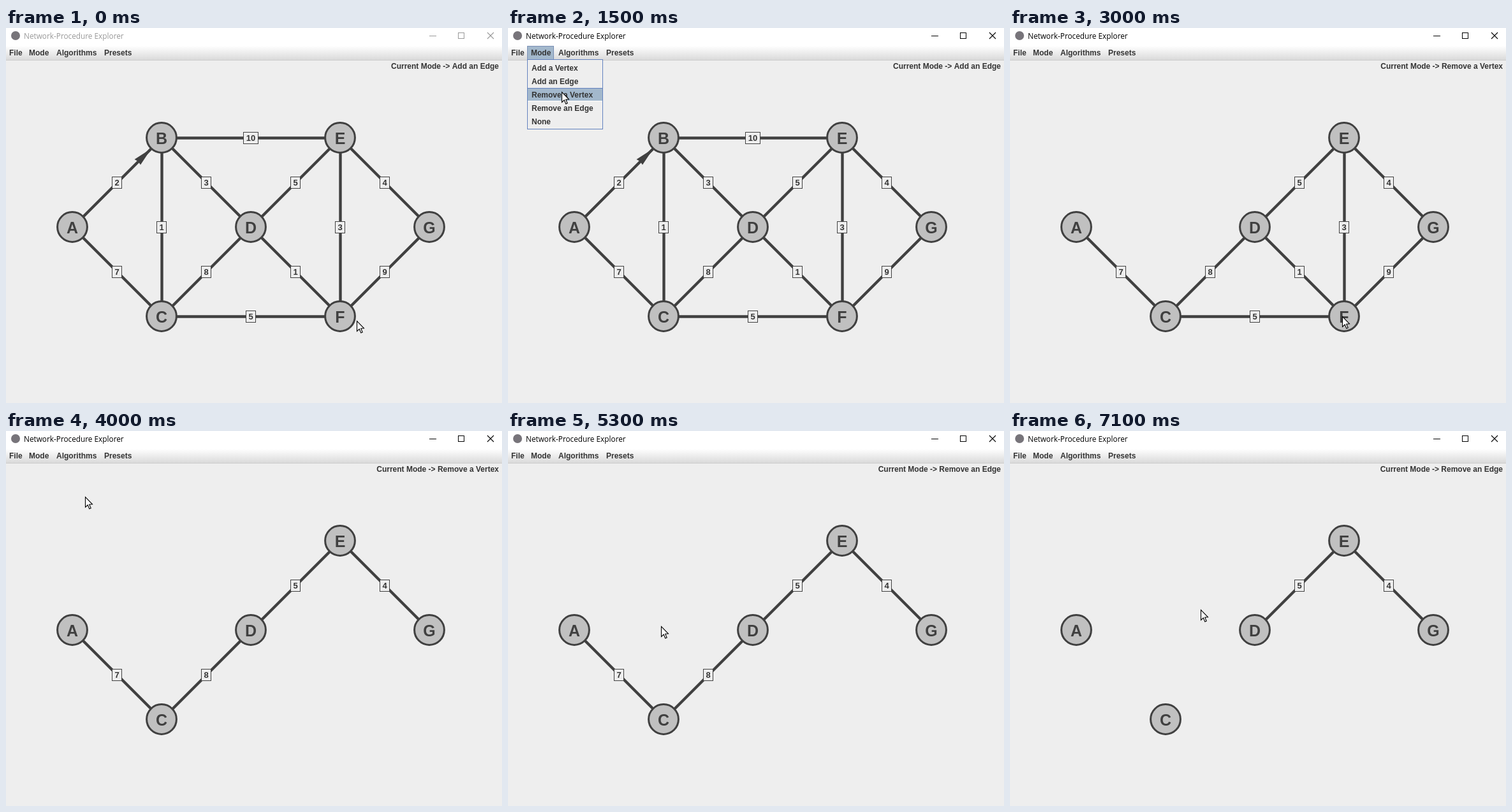
An HTML page with a canvas for the animation above (7.2 s loop, 778x588 px).

```html
<!DOCTYPE html>
<html lang="en">
<head>
<meta charset="utf-8">
<title>Network-Procedure Explorer</title>
<style>
  html, body { margin: 0; width: 778px; height: 588px; overflow: hidden; background: #eee; }
  canvas { display: block; }
</style>
</head>
<body>
<canvas id="stage" width="778" height="588"></canvas>
<script>
const ctx = document.getElementById('stage').getContext('2d');
const LOOP = 7200, STEP = 100, DARK = '#404040', INK = '#333', BLUE = '#6382bf';
const SANS = '"Liberation Sans", Arial, sans-serif';

const vertices = {
  A: [104, 312], B: [244, 172], C: [244, 452], D: [384, 312],
  E: [524, 172], F: [524, 452], G: [664, 312]
};
const edges = ['AB2', 'AC7', 'BC1', 'BD3', 'BE10', 'CD8', 'CF5', 'DE5', 'DF1', 'EF3', 'EG4', 'FG9'];
const removedAt = { B: 2400, F: 3300, CD: 5700, AC: 6400 };
const items = ['Add a Vertex', 'Add an Edge', 'Remove a Vertex', 'Remove an Edge', 'None'];

// Pointer keys: time, x, y
const path = [
  [0, 550, 459], [800, 52, 40], [1000, 68, 54], [1600, 85, 104], [1800, 85, 104],
  [2200, 229, 160], [2300, 234, 165], [2400, 234, 165], [2900, 521, 452], [3400, 521, 452],
  [4200, 50, 38], [4300, 52, 41], [4700, 80, 129], [4800, 80, 129], [5600, 314, 388],
  [5800, 314, 388], [6000, 189, 384], [6200, 174, 387], [6500, 174, 387], [7100, 299, 280], [LOOP, 299, 280]
];

function pointerAt(t) {
  const i = path.findIndex(k => k[0] > t);
  const [t0, x0, y0] = path[i - 1], [t1, x1, y1] = path[i];
  const u = (t - t0) / (t1 - t0), e = u * u * (3 - 2 * u);
  return [x0 + (x1 - x0) * e, y0 + (y1 - y0) * e].map(Math.round);
}

function rect(x, y, w, h, fill) {
  ctx.fillStyle = fill;
  ctx.fillRect(x, y, w, h);
}

function frame(x, y, w, h, color) {
  ctx.strokeStyle = color;
  ctx.lineWidth = 1;
  ctx.strokeRect(x + .5, y + .5, w - 1, h - 1);
}

function line(x0, y0, x1, y1, width, color) {
  ctx.strokeStyle = color;
  ctx.lineWidth = width;
  ctx.beginPath();
  ctx.moveTo(x0, y0);
  ctx.lineTo(x1, y1);
  ctx.stroke();
}

function text(s, x, y, font, color = INK, align = 'left') {
  ctx.font = font;
  ctx.fillStyle = color;
  ctx.textAlign = align;
  ctx.fillText(s, x, y);
}

function polygon(points, fill) {
  ctx.beginPath();
  points.forEach(([x, y]) => ctx.lineTo(x, y));
  ctx.closePath();
  ctx.fillStyle = fill;
  ctx.fill();
}

const bold = size => `bold ${size}px ${SANS}`;

function drawWindow(t, open) {
  const active = t >= 800, color = active ? '#000' : '#999';
  rect(0, 0, 778, 588, '#eee');
  rect(0, 0, 778, 28, '#fff');
  ctx.fillStyle = '#77747a';
  ctx.beginPath();
  ctx.arc(15, 12, 7, 0, 7);
  ctx.fill();
  text('Network-Procedure Explorer', 28, 17, '11.8px "Open Sans", "Noto Sans", sans-serif', color);
  line(664, 12.5, 675, 12.5, 1, color);
  frame(709, 7, 10, 10, color);
  line(755, 7, 765, 17, 1.1, color);
  line(765, 7, 755, 17, 1.1, color);

  const shade = ctx.createLinearGradient(0, 28, 0, 50);
  shade.addColorStop(0, '#fff');
  shade.addColorStop(1, '#dadada');
  rect(0, 28, 778, 22, shade);
  rect(0, 50, 778, 1, '#ccc');
  if (open) {
    rect(30, 28, 42, 22, '#a3b8cc');
    frame(30, 28, 42, 22, '#7a8fb5');
  }
  [['File', 5], ['Mode', 36], ['Algorithms', 79], ['Presets', 154]]
    .forEach(([s, x]) => text(s, x, 43, bold(12)));

  const mode = items[t < 1900 ? 1 : t < 4900 ? 2 : 3];
  text('Current Mode -> ' + mode, 773, 64, bold(12), INK, 'right');
}

function drawGraph(t) {
  const alive = id => !(t >= removedAt[id]);
  for (const edge of edges) {
    const [a, b] = edge, weight = edge.slice(2);
    if (![a, b, a + b].every(alive)) continue;
    const [x0, y0] = vertices[a], [x1, y1] = vertices[b];
    line(x0 + .5, y0 + .5, x1 + .5, y1 + .5, 4.4, DARK);
    if (a + b === 'AB') polygon([[228, 189], [201.5, 206], [207, 209], [211, 214.5]], DARK);
    const x = (x0 + x1) / 2, y = (y0 + y1) / 2, w = weight.length > 1 ? 24 : 16;
    rect(x - w / 2, y - 9, w, 19, '#eee');
    frame(x - w / 2, y - 9, w, 19, DARK);
    text(weight, x, y + 5, bold(13), INK, 'center');
  }
  for (const id in vertices) {
    if (!alive(id)) continue;
    const [x, y] = vertices[id];
    ctx.beginPath();
    ctx.arc(x, y, 23.4, 0, 7);
    ctx.fillStyle = '#c0c0c0';
    ctx.fill();
    ctx.strokeStyle = DARK;
    ctx.lineWidth = 3;
    ctx.stroke();
    text(id, x, y + 10, bold(25), DARK, 'center');
  }
}

function drawMenu(y) {
  rect(30, 49, 119, 110, '#eee');
  frame(30, 49, 119, 110, BLUE);
  const hover = Math.floor((y - 52) / 21);
  items.forEach((s, i) => {
    const top = 52 + i * 21;
    if (i === hover) {
      rect(31, top, 117, 20, '#a3b8cc');
      rect(31, top, 117, 1, BLUE);
      rect(31, top + 20, 117, 1, '#fff');
    }
    text(s, 37, top + 15, bold(12));
  });
}

function drawPointer(x, y) {
  ctx.save();
  ctx.translate(x + .5, y + .5);
  polygon([[0, 0], [0, 16], [3.7, 12.5], [6.3, 18.5], [8.7, 17.5], [6.2, 11.7], [11, 11.3]], '#fff');
  ctx.strokeStyle = '#000';
  ctx.lineWidth = 1.1;
  ctx.stroke();
  ctx.restore();
}

function draw(now) {
  const t = Math.floor(now % LOOP / STEP) * STEP;
  const open = (t >= 800 && t < 1900) || (t >= 4300 && t < 4900);
  const [x, y] = pointerAt(t);
  drawWindow(t, open);
  drawGraph(t);
  if (open) drawMenu(y);
  drawPointer(x, y);
}

const start = performance.now();
function tick() {
  draw(performance.now() - start);
  requestAnimationFrame(tick);
}
tick();
</script>
</body>
</html>
```
